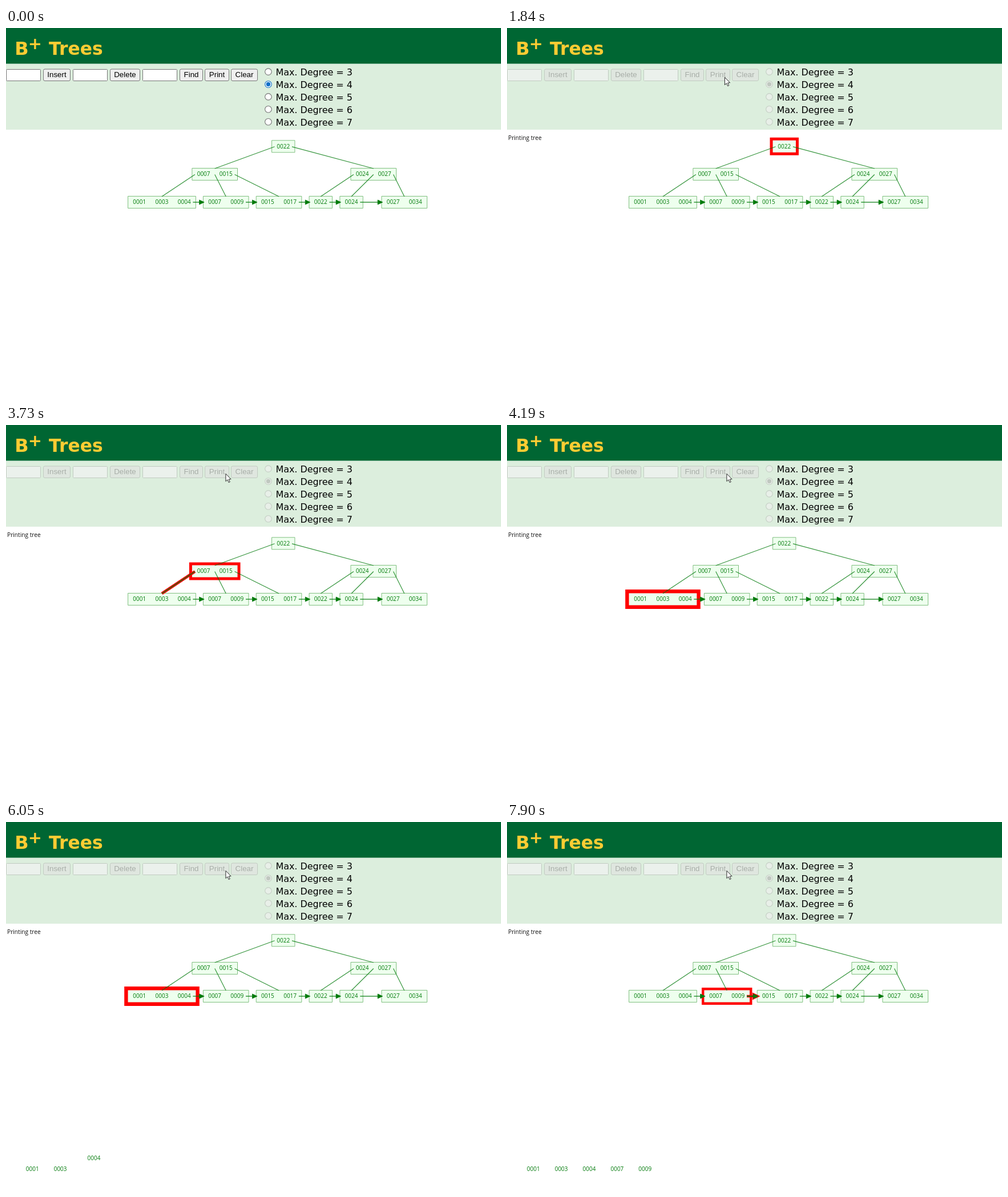
These frames come from a looping animation (867 px wide and 646 px high, 8000 ms). An HTML page with a canvas:

```html
<!DOCTYPE html>
<html lang="en">
<head>
<meta charset="utf-8">
<title>B+ Trees</title>
<style>
html, body { margin: 0; width: 100%; height: 100%; overflow: hidden; background: #fff; }
canvas { display: block; }
</style>
</head>
<body>
<canvas id="stage" width="867" height="646"></canvas>
<script>
const ctx = document.getElementById('stage').getContext('2d');
const LOOP = 8000;
const GREEN = '#007a0a';
const RED = '#ff0000';
const UI = '"DejaVu Sans", sans-serif';
const FORM = '"Liberation Sans", Arial, sans-serif';
const TREE = '"Open Sans", "Noto Sans", sans-serif';

// Tree nodes: centre x, centre y, keys
const node = (x, y, ...keys) => ({ x, y, keys, w: keys.length * 39.2 + 1.2, h: 21 });
const root = node(485.7, 207.3, '0022');
const left = node(365.7, 256, '0007', '0015');
const right = node(643.7, 256, '0024', '0027');
const leaves = [
  node(273, 305, '0001', '0003', '0004'),
  node(385.2, 305, '0007', '0009'),
  node(478, 305, '0015', '0017'),
  node(551.2, 305, '0022'),
  node(605, 305, '0024'),
  node(697.7, 305, '0027', '0034')
];
const nodes = [root, left, right, ...leaves];

// Edges: child links leave the parent at evenly spread slots, leaf links are arrows
const childEdges = (parent, kids) => kids.map((kid, i) => ({
  x1: parent.x + (2 * i / parent.keys.length - 1) * (parent.w / 2 - 5), y1: parent.y + 0.5,
  x2: kid.x, y2: kid.y - kid.h / 2 + 0.5
}));
const rootEdges = childEdges(root, [left, right]);
const leftEdges = childEdges(left, leaves.slice(0, 3));
const rightEdges = childEdges(right, leaves.slice(3));
const leafEdges = leaves.slice(1).map((next, i) => ({
  x1: leaves[i].x + leaves[i].w / 2 - 5, y1: next.y,
  x2: next.x - next.w / 2 + 1.7, y2: next.y, arrow: true
}));
const edges = [...rootEdges, ...leftEdges, ...rightEdges, ...leafEdges];

// The screen refreshes at these moments: time, cursor, glow size, lit node, lit edge
const REST = [384.5, 85];
const steps = [
  [0, null],
  [460, [705, 525]],
  [920, [404, 166]],
  [1380, [378.5, 86]],
  [1840, [381, 86], 5, root],
  [2320, REST, 7, root, rootEdges[0]],
  [2780, REST, 5, root, rootEdges[0]],
  [3260, REST, 4, left],
  [3730, REST, 5, left, leftEdges[0]],
  [4190, REST, 6.4, leaves[0]],
  [4670, REST, 4.5, leaves[0]],
  [5130, REST, 3.5, leaves[0]],
  [5590, REST, 6.4, leaves[0]],
  [6050, REST, 6.4, leaves[0]],
  [6510, REST, 3.7, leaves[0], leafEdges[0]],
  [6980, REST, 3.5, leaves[1]],
  [7440, REST, 7.2, leaves[1]],
  [7900, REST, 4.4, leaves[1], leafEdges[1]]
];

// Printed keys fly from their leaf to the output row
const FLIGHT = 519;
const keyX = (n, i) => n.x + (i - (n.keys.length - 1) / 2) * 39.2;
const prints = [[0, 0, 4488], [0, 1, 5007], [0, 2, 5562], [1, 0, 6675], [1, 1, 7194]]
  .map(([leaf, i, start], slot) => ({
    key: leaves[leaf].keys[i], start,
    x1: keyX(leaves[leaf], i), y1: 305, x2: 46.2 + slot * 48.9, y2: 607.3
  }));

function text(str, x, y, font, color, align = 'left') {
  ctx.font = font;
  ctx.fillStyle = color;
  ctx.textAlign = align;
  ctx.fillText(str, x, y);
}

function box(x, y, w, h, fill, stroke, r = 0) {
  ctx.beginPath();
  ctx.roundRect(x, y, w, h, r);
  ctx.fillStyle = fill;
  ctx.fill();
  if (!stroke) return;
  ctx.strokeStyle = stroke;
  ctx.lineWidth = 1;
  ctx.stroke();
}

function disc(x, y, r, fill) {
  ctx.beginPath();
  ctx.arc(x, y, r, 0, Math.PI * 2);
  ctx.fillStyle = fill;
  ctx.fill();
}

function drawHeader() {
  box(0, 0, 867, 178, '#dceedd');
  box(0, 0, 867, 62.5, '#006633');
  text('B', 15.3, 47, `bold 32px ${UI}`, '#ffcc33');
  text('+', 38.8, 37, `bold 29px ${UI}`, '#ffcc33');
  text('Trees', 75, 47, `bold 31.4px ${UI}`, '#ffcc33');
}

function drawControls(disabled, hover) {
  const border = disabled ? '#c1cbc1' : '#767676';
  for (const x of [0.5, 117.5, 239.5]) {
    box(x, 72.5, 60, 20, disabled ? '#ebf1ec' : '#fff', border, 1);
  }
  const buttons = [['Insert', 65.5, 47], ['Delete', 182.5, 52], ['Find', 304.5, 40],
    ['Print', 348.5, 42], ['Clear', 394.5, 46]];
  for (const [name, x, w] of buttons) {
    const hot = hover && name === 'Print';
    const fill = disabled ? '#dfe6df' : hot ? '#e3e3e3' : '#efefef';
    box(x, 72, w, 20.5, fill, hot ? '#505050' : border, 2.5);
    text(name, x + w / 2, 86.3, `13.33px ${FORM}`, disabled ? '#a8aea8' : '#000', 'center');
  }
  for (let i = 0; i < 5; i++) {
    const y = 76.6 + i * 21.9, on = i === 1;
    const ring = disabled ? '#c5cfc5' : on ? '#0d6fc8' : '#767676';
    disc(459.4, y, 6.3, ring);
    disc(459.4, y, 5.2, disabled ? '#e8efe8' : '#fff');
    if (on) disc(459.4, y, 3.7, disabled ? '#c0c8c0' : ring);
    text(`Max. Degree = ${i + 3}`, 472.5, 83 + i * 21.9, `15.9px ${UI}`, '#000');
  }
}

const label = (str, x, y) => text(str, x, y + 3.2, `10px ${TREE}`, GREEN, 'center');

function drawNode(n, glow) {
  const x = n.x - n.w / 2, y = n.y - n.h / 2;
  if (glow) box(x - glow, y - glow, n.w + 2 * glow, n.h + 2 * glow, RED);
  box(x, y, n.w, n.h, '#eeffee', glow ? null : '#80bf80');
  n.keys.forEach((key, i) => label(key, keyX(n, i), n.y));
}

function strokeEdge({ x1, y1, x2, y2, arrow }, width, color) {
  ctx.strokeStyle = ctx.fillStyle = color;
  ctx.lineWidth = width;
  ctx.beginPath();
  ctx.moveTo(x1, y1);
  ctx.lineTo(x2 - (arrow ? 8 : 0), y2);
  ctx.stroke();
  if (!arrow) return;
  ctx.beginPath();
  ctx.moveTo(x2, y2);
  ctx.lineTo(x2 - 8.5, y2 - 4);
  ctx.lineTo(x2 - 8.5, y2 + 4);
  ctx.closePath();
  ctx.lineWidth = width > 2 ? width * 0.7 : 0.8;
  ctx.stroke();
  ctx.fill();
}

function drawEdge(edge, glow) {
  if (glow) strokeEdge(edge, glow, RED);
  strokeEdge(edge, glow ? 1.8 : 1.2, edge.arrow ? '#007a0a' : 'rgba(0,122,10,0.8)');
}

function drawPrint({ key, start, x1, y1, x2, y2 }, t) {
  if (t < start) return;
  const p = Math.min(1, (t - start) / FLIGHT);
  label(key, x1 + (x2 - x1) * p, y1 + (y2 - y1) * p);
}

function drawCursor([x, y]) {
  const shape = [[0, 0], [0, 13.2], [3, 10.4], [5.2, 15.2], [7.3, 14.2], [5.2, 9.6], [9.2, 9.4]];
  ctx.beginPath();
  for (const [dx, dy] of shape) ctx.lineTo(x + dx + 0.4, y + dy + 0.4);
  ctx.closePath();
  ctx.fillStyle = '#fff';
  ctx.fill();
  ctx.strokeStyle = '#111';
  ctx.lineWidth = 0.9;
  ctx.stroke();
}

function draw(time) {
  const [t, cursor, glow, litNode, litEdge] = steps.findLast(s => s[0] <= time);
  const printing = t >= 1840;
  ctx.fillStyle = '#fff';
  ctx.fillRect(0, 0, 867, 646);
  drawHeader();
  drawControls(printing, t === 1380);
  if (printing) text('Printing tree', 2, 195.7, `10.2px ${TREE}`, '#111');
  for (const n of nodes) if (n !== litNode) drawNode(n);
  if (litNode) drawNode(litNode, glow);
  for (const e of edges) drawEdge(e, e === litEdge ? glow : 0);
  for (const p of prints) drawPrint(p, t);
  if (cursor) drawCursor(cursor);
}

function tick() {
  draw(performance.now() % LOOP);
  requestAnimationFrame(tick);
}
tick();
</script>
</body>
</html>
```
